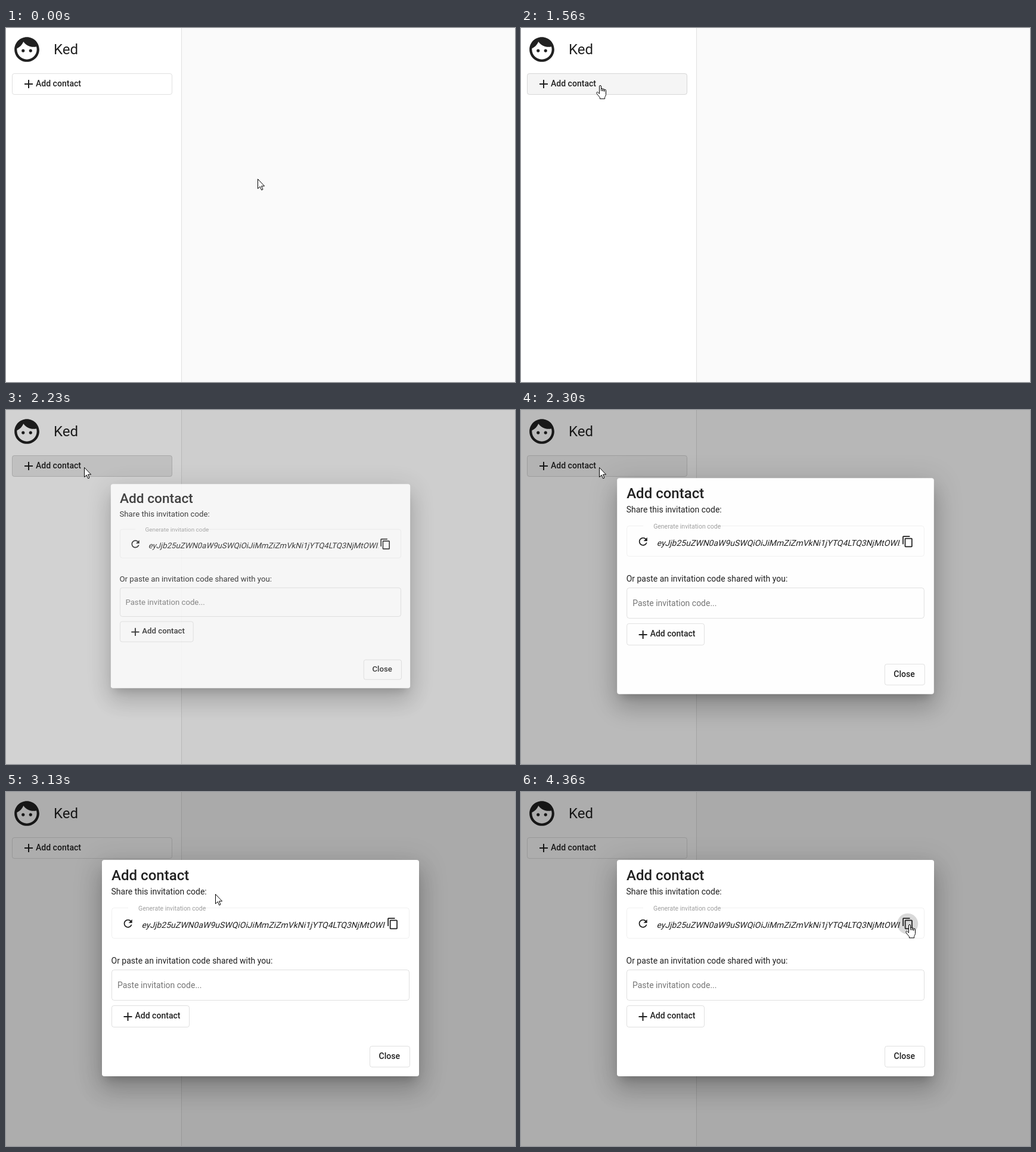
An HTML page that plays this animation: 854x594 px, repeating every 6.03 s.

```html
<!DOCTYPE html>
<html lang="en">
<head>
<meta charset="utf-8">
<title>Add contact</title>
<style>
  html, body { margin: 0; width: 100%; height: 100%; overflow: hidden; background: #fff; }
  #stage { position: relative; width: 854px; height: 594px; overflow: hidden; }
  #stage > * { position: absolute; }
  svg { display: block; font: 14px Roboto, sans-serif; fill: #212121; }
  .page, #backdrop { left: 0; top: 0; width: 854px; height: 594px; }
  #backdrop { background: rgba(0, 0, 0, .32); }
  #dialog {
    left: 161px; top: 114px; width: 532px; height: 363px;
    border-radius: 4px; background: #fff;
    box-shadow: 0 11px 15px -7px rgba(0, 0, 0, .2),
                0 24px 38px 3px rgba(0, 0, 0, .14),
                0 9px 46px 8px rgba(0, 0, 0, .12);
  }
  .medium { font-weight: 500; }
  .title { font-size: 24px; }
  .box { fill: none; stroke: rgba(0, 0, 0, .12); }
  .plus { stroke: #212121; stroke-width: 2; }
  .cursor { fill: #fff; stroke: #000; stroke-linejoin: round; }
</style>
</head>
<body>
<div id="stage">
  <svg class="page" viewBox="0 0 854 594">
    <defs>
      <clipPath id="buttonClip"><rect x="10" y="76" width="269" height="36" rx="4"/></clipPath>
    </defs>
    <rect width="294" height="594" fill="#fff"/>
    <rect x="295" width="559" height="594" fill="#fafafa"/>
    <rect x="294" width="1" height="594" fill="#e0e0e0"/>
    <path transform="translate(10 11) scale(2.0833)" d="M9 11.75a1.25 1.25 0 1 0 0 2.5 1.25 1.25 0 0 0 0-2.5zm6 0a1.25 1.25 0 1 0 0 2.5 1.25 1.25 0 0 0 0-2.5zM12 2C6.48 2 2 6.48 2 12s4.48 10 10 10 10-4.48 10-10S17.52 2 12 2zm0 18c-4.41 0-8-3.59-8-8 0-.29.02-.58.05-.86 2.36-1.05 4.23-2.98 5.21-5.37C11.07 8.33 14.05 10 17.42 10c.78 0 1.53-.09 2.25-.26.21.71.33 1.47.33 2.26 0 4.41-3.59 8-8 8z"/>
    <text class="title" x="80" y="44">Ked</text>
    <rect class="box" x="10.5" y="76.5" width="268" height="35" rx="3.5"/>
    <path class="plus" d="M31 94h14M38 87v14"/>
    <text class="medium" x="50" y="98">Add contact</text>
    <g clip-path="url(#buttonClip)" fill="#000">
      <rect id="hover" x="10" y="76" width="269" height="36"/>
      <circle id="ripple" cx="131" cy="96"/>
    </g>
  </svg>

  <div id="backdrop"></div>

  <div id="dialog">
    <svg width="532" height="363" viewBox="161 114 532 363">
      <defs>
        <clipPath id="copyClip"><circle cx="648.7" cy="221.2" r="17.5"/></clipPath>
      </defs>
      <text class="title medium" x="177" y="148">Add contact</text>
      <text x="176.5" y="172">Share this invitation code:</text>

      <path fill="none" stroke="rgba(0,0,0,.06)" d="M205 194.5H181.5a4 4 0 0 0-4 4v43a4 4 0 0 0 4 4h491a4 4 0 0 0 4-4v-43a4 4 0 0 0-4-4H329"/>
      <text x="222" y="199" font-size="10.5" fill="rgba(0,0,0,.38)">Generate invitation code</text>
      <path transform="translate(194.2 210.2) scale(.875)" d="M17.65 6.35C16.2 4.9 14.21 4 12 4c-4.42 0-7.99 3.58-7.99 8s3.57 8 7.99 8c3.73 0 6.84-2.55 7.73-6h-2.08c-.82 2.33-3.04 4-5.65 4-3.31 0-6-2.69-6-6s2.69-6 6-6c1.66 0 3.14.69 4.22 1.78L13 11h7V4l-2.35 2.35z"/>
      <svg x="222" y="205" width="414" height="30">
        <text transform="translate(5.5 23) skewX(-14)">eyJjb25uZWN0aW9uSWQiOiJiMmZiZmVkNi1jYTQ4LTQ3NjMtOWI2</text>
      </svg>
      <g clip-path="url(#copyClip)"><circle id="copyRipple" cx="650" cy="222" fill="rgba(0,0,0,.15)"/></g>
      <path transform="translate(638.5 210.2) scale(.875)" d="M16 1H4c-1.1 0-2 .9-2 2v14h2V3h12V1zm3 4H8c-1.1 0-2 .9-2 2v14c0 1.1.9 2 2 2h11c1.1 0 2-.9 2-2V7c0-1.1-.9-2-2-2zm0 16H8V7h11v14z"/>

      <text x="176.5" y="288">Or paste an invitation code shared with you:</text>
      <rect class="box" x="177.5" y="298.5" width="499" height="51" rx="4"/>
      <text x="187" y="329" fill="rgba(0,0,0,.54)">Paste invitation code...</text>

      <rect class="box" x="177.5" y="358.5" width="130" height="36" rx="3.5"/>
      <path class="plus" d="M197.5 377h14M204.5 370v14"/>
      <text class="medium" x="216.5" y="380">Add contact</text>
      <rect class="box" x="610.5" y="426.5" width="67" height="35" rx="3.5"/>
      <text class="medium" x="625.5" y="448">Close</text>
    </svg>
  </div>

  <svg class="page" viewBox="0 0 854 594">
    <g id="pointer" class="cursor">
      <path id="arrow" d="M.5.5V16.6L4.2 13.1 6.7 18.9 9 17.9 6.6 12.2H11.6Z"/>
      <path id="hand" transform="translate(-5 0)" d="M5.5 12.8V2a1.5 1.5 0 0 1 3 0V9.5 6.7a1.35 1.35 0 0 1 2.7 0V10 7.5a1.3 1.3 0 0 1 2.6 0V10.5 8.6a1.35 1.35 0 0 1 2.7 0V15.5c0 2-1.7 3.6-1.9 5V22.8H6.4V20.8C5.2 19 2 15.6.9 13.4.2 12 2 10.8 3.2 12L5.5 14.2Z"/>
    </g>
  </svg>
</div>

<script>
const LOOP = 6030;
const HALF_REFRESH = 8;
const $ = id => document.getElementById(id);
const clamp = v => Math.min(1, Math.max(0, v));

// Screen refreshes as bursts: [first, last, count]
const BURSTS = [[0, 0, 1], [790, 1350, 9], [1420, 1560, 3], [1960, 2510, 9],
  [2640, 2640, 1], [2840, 3400, 9], [3470, 3820, 6], [4150, 4360, 4]];
const TICKS = BURSTS.flatMap(([first, last, count]) =>
  Array.from({ length: count }, (_, i) =>
    count > 1 ? Math.floor((first + (last - first) * i / (count - 1)) / 10) * 10 : first));

// Pointer hotspot: [time, x, y]
const PATH = [[720, 422, 253], [860, 395, 238], [1000, 329, 203], [1180, 224, 146],
  [1350, 147, 106], [1490, 131, 96], [2770, 131, 96], [2910, 165, 110],
  [3120, 351, 171], [3260, 500, 206], [3400, 602, 227], [3540, 640, 237],
  [3680, 650, 228], [3820, 650, 222]];

function bezier(x1, y1, x2, y2) {
  const at = (a, b, s) => 3 * a * s * (1 - s) ** 2 + 3 * b * s * s * (1 - s) + s ** 3;
  return u => {
    if (u <= 0 || u >= 1) return clamp(u);
    let lo = 0, hi = 1;
    for (let i = 0; i < 24; i++) {
      const mid = (lo + hi) / 2;
      if (at(x1, x2, mid) < u) lo = mid; else hi = mid;
    }
    return at(y1, y2, lo);
  };
}
const decelerate = bezier(0, 0, .2, 1);
const swift = bezier(.25, .8, .25, 1);
const standard = bezier(.35, 0, .25, 1);
const progress = (t, start, length, ease) => ease(clamp((t - start) / length));

function pointerAt(t) {
  const next = PATH.findIndex(p => p[0] > t);
  if (next === 0) return PATH[0].slice(1);
  if (next < 0) return PATH[PATH.length - 1].slice(1);
  const [t0, x0, y0] = PATH[next - 1], [t1, x1, y1] = PATH[next];
  const u = (t - t0) / (t1 - t0);
  return [Math.round(x0 + (x1 - x0) * u), Math.round(y0 + (y1 - y0) * u)];
}

function draw(t) {
  const hover = progress(t, 1350, 200, standard) - progress(t, 2160, 200, standard);
  $('hover').style.opacity = .04 * hover;
  $('ripple').setAttribute('r', 149 * progress(t, 1955, 270, decelerate));
  $('ripple').style.opacity = .1 * (1 - progress(t, 2185, 400, decelerate));

  $('backdrop').style.opacity = progress(t, 2160, 400, swift);
  const open = progress(t, 2160, 150, decelerate);
  $('dialog').style.opacity = open;
  $('dialog').style.transform = open < 1 ? `scale(${.7 + .3 * open})` : 'none';
  $('copyRipple').setAttribute('r', 26 * progress(t, 4125, 225, decelerate));

  const pointing = (t >= 1350 && t < 2160) || t >= 3610;
  $('arrow').style.display = pointing ? 'none' : '';
  $('hand').style.display = pointing ? '' : 'none';
  $('pointer').setAttribute('transform', `translate(${pointerAt(t).join(' ')})`);
}

const start = performance.now();
function frame() {
  const t = (performance.now() - start + HALF_REFRESH) % LOOP;
  draw(TICKS.filter(tick => tick <= t).pop());
  requestAnimationFrame(frame);
}
frame();
</script>
</body>
</html>
```
